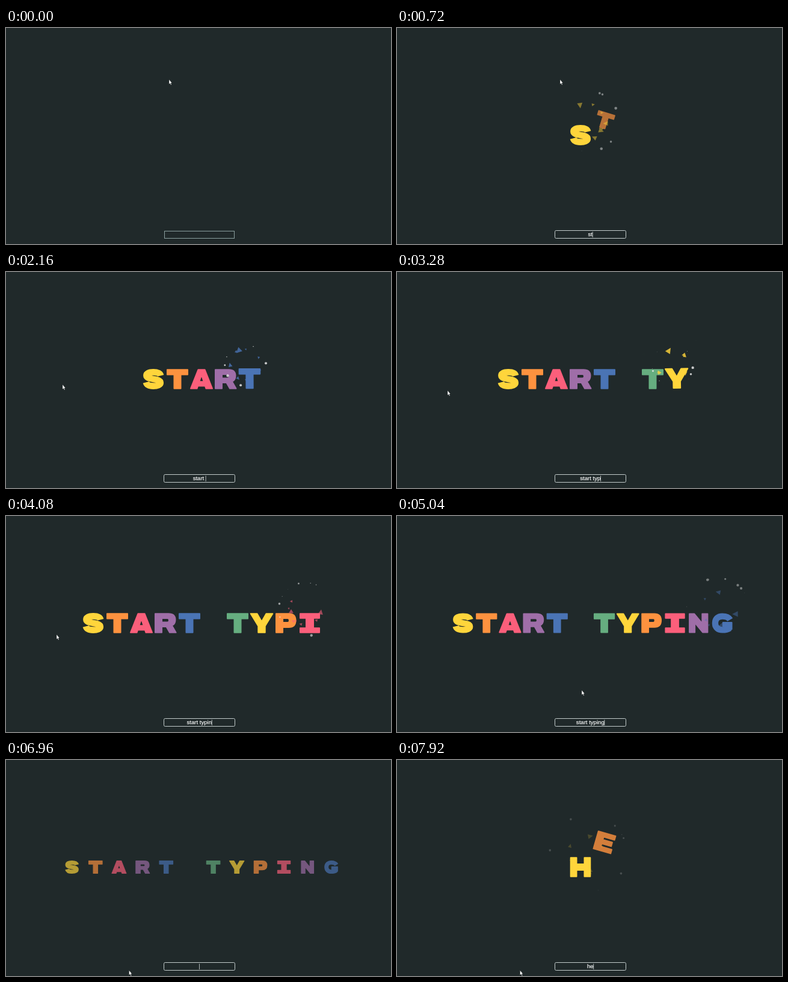
An HTML page that plays this animation: 640 by 361 pixels, repeating every 8 s.

```html
<!DOCTYPE html>
<html lang="en">
<head>
<meta charset="utf-8">
<title>Start typing</title>
<style>
html, body { margin: 0; width: 100%; height: 100%; overflow: hidden; background: #20292a; }
svg { display: block; width: 640px; height: 361px; }
text { font: 9.6px "Liberation Sans", Arial, sans-serif; fill: #f4f6f6; stroke: #f4f6f6; stroke-width: .2px;
  text-anchor: middle; white-space: pre; }
</style>
</head>
<body>
<svg id="stage" viewBox="0 0 640 361">
  <rect width="640" height="361" fill="#20292a"/>
  <g id="letters"></g>
  <g id="decor"></g>
  <rect id="idle" x="263.5" y="339.5" width="116" height="12" fill="none" stroke="#8ba09f"/>
  <rect id="focus" x="262.5" y="338.5" width="118" height="13" rx="2" fill="none" stroke="#c3cccc"/>
  <text id="typed" x="321.3" y="348.3"></text>
  <rect id="caret" y="340.5" width="0.8" height="9.5" fill="#d4dada"/>
  <path id="mouse" d="M0 0V8L1.8 6.4 3 9.2 4.2 8.7 3 6H5Z" fill="#fff" stroke="#111818" stroke-width="0.4"/>
</svg>
<script>
const LOOP = 8000, SIZE = 48, MID = 325, BASE = 179;
const FOCUS = 80, CLEAR = 6892, DELAY = 170;
const COLORS = ['#ffd53b', '#fd923f', '#fb5f7b', '#9f6ea8', '#4a74b5', '#2bb19b', '#66ae80'];

// fill: outline with softened corners; line: heavy stroke for round letters
const GLYPHS = {
  s: { line: 'M12.2-5.8C11-10.5 6-11.6 0-11.6C-8-11.6-11.6-9.2-11.6-6.2C-11.6-1.6-5-1 0 0C6 1 11.8 2 11.8 6.2C11.8 9.6 7 11.6 0 11.6C-7 11.6-11 10-12.2 5.4' },
  t: { fill: 'M-17-15.8H17V-7.5H5.5V15.8H-5.5V-7.5H-17Z' },
  a: { fill: 'M-5.5-15.8H5.5L18 15.8H7.5L6 11.5H-6L-7.5 15.8H-18ZM-3.7 4.2H3.7L0-7Z' },
  r: { fill: 'M-17-15.8H5C13-15.8 16.5-11.5 16.5-5.5C16.5-1 14.5 2.5 11 4.2L17.5 15.8H7L1.5 6H-6V15.8H-17ZM-6-8H3.5C6.8-8 6.8-1.5 3.5-1.5H-6Z' },
  y: { fill: 'M-18.3-15.8H-7.5L0-2.5 7.5-15.8H18.3L5.7 5V15.8H-5.7V5Z' },
  p: { fill: 'M-16-15.8H5C13-15.8 16.5-11.5 16.5-4.5C16.5 2.5 13 7 5 7H-5V15.8H-16ZM-5-8H3.5C6.8-8 6.8-1 3.5-1H-5Z' },
  i: { fill: 'M-16-15.8H16V-8.3H6V8.3H16V15.8H-16V8.3H-6V-8.3H-16Z' },
  n: { fill: 'M-15.5-15.8H-7L6.2.5V-15.8H15.5V15.8H7L-6.2-.5V15.8H-15.5Z' },
  g: { fill: 'M1.5-1H16.5V10.5L9 13V5.5H1.5Z',
       line: 'M13.6-5.8C11-10.3 6-11.6.5-11.6C-7-11.6-11.7-7.5-11.7 0C-11.7 7.5-7 11.6.5 11.6C6 11.6 10 10.5 13 8.5' },
  h: { fill: 'M-16.3-15.8H-6.5V-5H6.5V-15.8H16.3V15.8H6.5V5H-6.5V15.8H-16.3Z' },
  e: { fill: 'M-15.5-15.8H15.5V-8.6H-4V-3.6H13V3.6H-4V8.6H15.5V15.8H-15.5Z' }
};

const KEYS = [];
const addWord = (word, times, end) => [...word].forEach((ch, i) =>
  KEYS.push({ ch, i, at: times[i], end, id: KEYS.length }));
addWord('start typing', [240, 620, 1000, 1330, 1805, 2152, 2540, 2928, 3275, 3640, 4080, 4550], CLEAR);
addWord('he', [7335, 7785], LOOP + 1000);

// time, x, y of the pointer's resting and turning points
const MOUSE = [[0, 271, 86], [1400, 271, 86], [1760, 101, 181], [2640, 84, 198], [4400, 84, 198],
  [5000, 307, 291], [5360, 307, 291], [6240, 204.5, 351.5], [LOOP, 204.5, 351.5]];

const $ = id => document.getElementById(id);
const clamp = v => Math.max(0, Math.min(1, v));
const mix = (a, b, p) => a + (b - a) * p;
const inOut = pow => p => p < .5 ? Math.pow(2 * p, pow) / 2 : 1 - Math.pow(2 - 2 * p, pow) / 2;
const quad = inOut(2), quart = inOut(4);
const backOut = p => { const q = p - 1; return q * q * (2.70158 * q + 1.70158) + 1; };

let seed = 41;
const rand = () => (seed = seed * 16807 % 2147483647) / 2147483647;

function set(el, attrs) {
  for (const k in attrs) el.setAttribute(k, attrs[k]);
}
function make(tag, attrs, parent) {
  const el = document.createElementNS('http://www.w3.org/2000/svg', tag);
  set(el, attrs);
  return parent.appendChild(el);
}
const show = (el, on) => el.setAttribute('visibility', on ? 'visible' : 'hidden');

const scaleFor = n => n > 11 ? .979 : 1;
const slot = (i, n) => MID + (i - (n - 1) / 2) * 40 * scaleFor(n);

function build(key) {
  const color = COLORS[key.i % 7], shape = GLYPHS[key.ch];
  if (!shape) return;
  key.lift = SIZE * (.75 + .25 * Math.sin(key.id * 2));
  key.turn = 50 * Math.sin(key.id * 2.444);
  key.el = make('g', {}, $('letters'));
  if (shape.fill) make('path', { d: shape.fill, fill: color, 'fill-rule': 'evenodd', stroke: color,
    'stroke-width': 2, 'stroke-linejoin': 'round' }, key.el);
  if (shape.line) make('path', { d: shape.line, fill: 'none', stroke: color, 'stroke-width': 10.6 }, key.el);

  key.burst = make('g', {}, $('decor'));
  key.bits = [];
  for (let j = 0; j < 8; j++) {
    const tri = make('path', { d: 'M-4.8-4.8H4.8L0 4.8Z', fill: color }, key.burst);
    key.bits.push({ el: tri, a: rand() * 360, far: rand() * .2, drift: rand() * 140 - 70,
      pose: ` rotate(${rand() * 360}) scale(${.3 + rand() * .7})` });
    const dot = make('circle', { r: rand() * 2.4, fill: '#eee' }, key.burst);
    key.bits.push({ el: dot, a: rand() * 360, far: 1, drift: 0, pose: '' });
  }
}
KEYS.forEach(build);

function drawLetter(key, t, count, last) {
  const on = t >= key.at && t < key.end + 100;
  show(key.el, on);
  if (!on) return;
  const age = t - key.at, p = clamp(age / 400);
  const gone = Math.pow(clamp((t - key.end) / 100), 3);
  const hop = age < 200 ? quart(age / 200) : 1 - quart(clamp(age / 200 - 1));
  const moved = key.i === count - 1 ? 1 : quart(clamp((t - last) / 100));
  const x = mix(slot(key.i, count - 1), slot(key.i, count), moved);
  const size = mix(scaleFor(count - 1), scaleFor(count), moved) * backOut(p) * (1 - gone);
  set(key.el, {
    transform: `translate(${x} ${BASE - key.lift * hop}) rotate(${key.turn * hop}) scale(${size})`,
    opacity: (1 - Math.pow(1 - p, 4)) * (1 - gone)
  });
}

function drawBurst(key, t) {
  const p = (t - key.at - DELAY) / 600, on = p >= 0 && p < 1;
  show(key.burst, on);
  if (!on) return;
  const q = quad(p), x0 = slot(key.i, key.i + 1) - 7, y0 = 156;
  key.burst.setAttribute('opacity', 1 - q);
  for (const b of key.bits) {
    const a = (b.a + b.drift * q) * Math.PI / 180, r = SIZE * (.52 + b.far * q);
    b.el.setAttribute('transform', `translate(${x0 + r * Math.cos(a)} ${y0 + r * Math.sin(a)})` + b.pose);
  }
}

function drawInput(t) {
  const focused = t >= FOCUS;
  show($('idle'), !focused);
  show($('focus'), focused);
  const live = KEYS.filter(k => t >= k.at && t < k.end), label = $('typed');
  const value = live.map(k => k.ch).join('');
  if (label.textContent !== value) label.textContent = value;
  const events = [FOCUS, CLEAR, ...KEYS.map(k => k.at)].filter(v => v <= t);
  const since = t - Math.max(...events);
  show($('caret'), focused && since < 1500 && since % 1000 < 500);
  const width = value ? label.getComputedTextLength() : 0;
  $('caret').setAttribute('x', 321 + width / 2);
}

function drawMouse(t) {
  const j = MOUSE.findIndex(m => m[0] > t), [t0, x0, y0] = MOUSE[j - 1], [t1, x1, y1] = MOUSE[j];
  const p = quad((t - t0) / (t1 - t0));
  $('mouse').setAttribute('transform', `translate(${mix(x0, x1, p)} ${mix(y0, y1, p)})`);
}

function draw(t) {
  const word = KEYS.filter(k => t >= k.at && t < k.end + 100);
  const count = word.length, last = count ? word[count - 1].at : 0;
  for (const key of KEYS) {
    if (!key.el) continue;
    drawLetter(key, t, count, last);
    drawBurst(key, t);
  }
  drawInput(t);
  drawMouse(t);
}

const start = performance.now();
function tick() {
  draw((performance.now() - start) % LOOP);
  requestAnimationFrame(tick);
}
tick();
</script>
</body>
</html>
```
